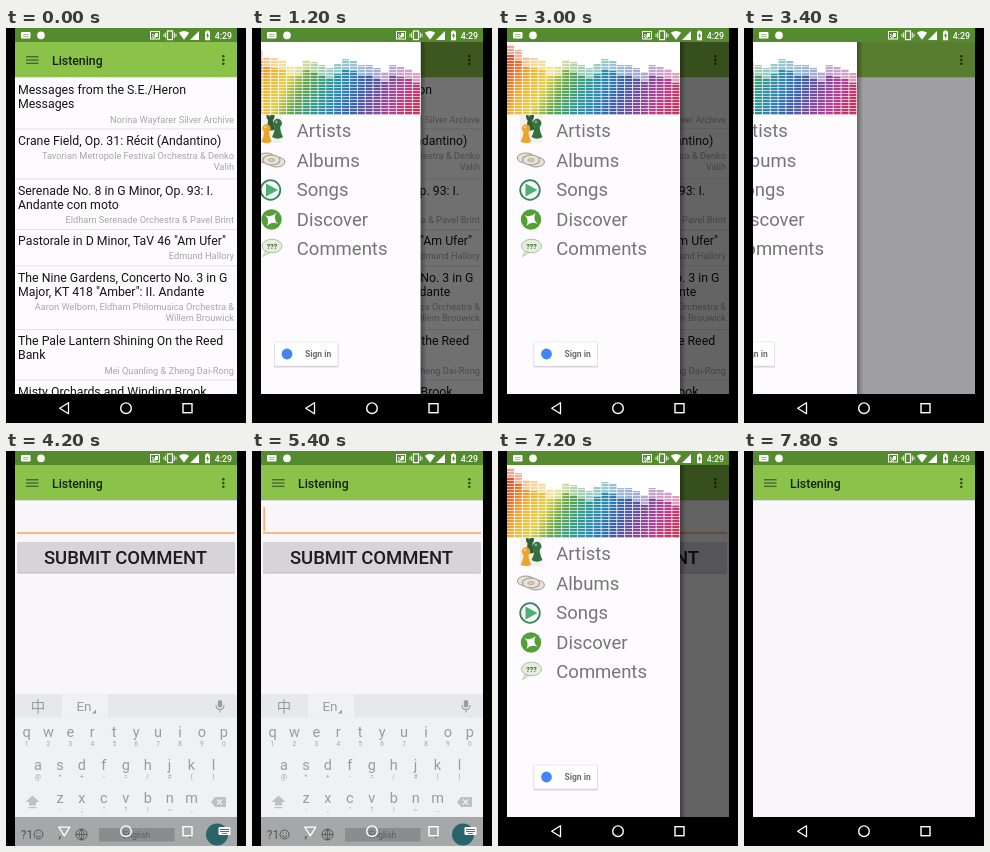
An HTML page for the animation above (8000 ms loop, 240 px wide and 395 px high).

```html
<!DOCTYPE html>
<html lang="en">
<head>
<meta charset="utf-8">
<title>Listening</title>
<style>
  html, body { margin: 0; width: 100%; height: 100%; overflow: hidden; background: #000; }
  svg { display: block; width: 240px; height: 395px; font-family: Roboto, "Noto Sans", sans-serif; }
  .title { font-size: 12.3px; fill: #141414; }
  .artist { font-size: 9.25px; fill: #a6a5a7; text-anchor: end; }
  .menu { font-size: 18.5px; fill: #757575; }
  .key { font-size: 14.5px; text-anchor: middle; fill: #70787d; }
  .hint { font-size: 6.5px; text-anchor: middle; fill: #7d868b; }
</style>
</head>
<body>
<svg id="stage" viewBox="0 0 240 395" xmlns="http://www.w3.org/2000/svg"></svg>
<script>
const rect = (x, y, w, h, fill, more = '') =>
  `<rect x="${x}" y="${y}" width="${w}" height="${h}" fill="${fill}" ${more}/>`;
const circle = (x, y, r, fill, more = '') =>
  `<circle cx="${x}" cy="${y}" r="${r}" fill="${fill}" ${more}/>`;
const path = (d, fill, more = '') => `<path d="${d}" fill="${fill}" ${more}/>`;
const line = (d, color, width = 1) =>
  path(d, 'none', `stroke="${color}" stroke-width="${width}"`);
const text = (x, y, s, cls, more = '') =>
  `<text x="${x}" y="${y}" class="${cls}" ${more}>${s.replace(/&/g, '&amp;')}</text>`;

// Song list: y of the first baseline, title lines, artist lines
const songs = [
  [66, ['Messages from the S.E./Heron', 'Messages'], ['Norina Wayfarer Silver Archive']],
  [116.5, ['Crane Field, Op. 31: Récit (Andantino)'], ['Tavorian Metropole Festival Orchestra & Denko', 'Valih']],
  [166.5, ['Serenade No. 8 in G Minor, Op. 93: I.', 'Andante con moto'], ['Eldham Serenade Orchestra & Pavel Brint']],
  [217, ['Pastorale in D Minor, TaV 46 "Am Ufer"'], ['Edmund Hallory']],
  [253.5, ['The Nine Gardens, Concerto No. 3 in G', 'Major, KT 418 "Amber": II. Andante'],
    ['Aaron Welborn, Eldham Philomusica Orchestra &', 'Willem Brouwick']],
  [317, ['The Pale Lantern Shining On the Reed', 'Bank'], ['Mei Quanling & Zheng Dai-Rong']],
  [367.5, ['Misty Orchards and Winding Brook'], []]
];

function listPage() {
  return rect(9, 49, 222, 317, '#fdfbfe') + songs.map(([y, titles, artists], i) => {
    const sub = y + (titles.length - 1) * 14.4 + 14.2;
    return (i ? rect(9, y - 16, 222, .8, '#dddbde') : '') +
      titles.map((s, n) => text(12, y + n * 14.4, s, 'title')).join('') +
      artists.map((s, n) => text(228, sub + n * 11.2, s, 'artist')).join('');
  }).join('');
}

const commentPage =
  rect(11, 81.3, 218, 1.4, '#f2a05a', 'id="underline"') +
  rect(11.5, 56, 1.2, 24, '#ff8a3c', 'id="cursor"') +
  rect(11, 92, 218, 30.5, '#bdbbbe', 'rx="1.5"') +
  rect(11, 91, 218, 30.5, '#d6d4d8', 'rx="1.5"') +
  text(119.5, 113, 'SUBMIT COMMENT', '', 'font-size="18.5" font-weight="500" text-anchor="middle" fill="#1c1c1c"');

const appBar =
  rect(9, 49, 222, 1, '#000', 'opacity=".1"') +
  rect(9, 14, 222, 35, '#8bc34a') +
  [28.7, 32, 35.3].map(y => rect(20, y - .6, 12.5, 1.3, '#46622a')).join('') +
  text(46, 37, 'Listening', '', 'font-size="12.3" font-weight="500" fill="#16200c"') +
  [28.2, 32, 35.8].map(y => circle(217.3, y, 1.3, '#33491d')).join('');

const statusBar =
  rect(9, 0, 222, 14, '#558b2f') +
  rect(15, 4, 9.5, 6.5, '#fff', 'rx="1"') + line('M17 6.5h5.5M17 8.4h5.5', '#7ca45e', .7) +
  circle(35, 7.4, 3.8, '#fff') +
  rect(144.5, 3.5, 9, 7.5, 'none', 'stroke="#fff"') +
  line('M146 6.3q3 .4 3.4 4M146 8.3q1.5 .3 1.7 2.5', '#fff') + rect(149, 5, 3, 4, '#fff') +
  rect(161.5, 3, 5, 8.6, 'none', 'stroke="#fff" stroke-width="1.2"') +
  line('M159.7 4.5v5.5M168.3 4.5v5.5M158 5.8v3M170 5.8v3', '#fff', .9) +
  path('M172.8 4.8q5.2-3.6 10.4 0L178 11.8Z', '#fff') +
  path('M193 3v9h-9Z', '#fff') +
  path('M199 3.5h1.3v-1h2.4v1h1.3v8.7h-5Z', '#fff') + path('M202 4.5l-2 3.5h1.2v3l2-3.7h-1.2Z', '#558b2f') +
  text(208.7, 10.8, '4:29', '', 'font-size="8.8" font-weight="500" fill="#fff"');

// Equalizer banner: bars share one slanted rainbow
const rainbow = ['#d2362e', '#e8692c', '#f2b32f', '#e3cf45', '#5fa648', '#2f9a8c', '#2d86b8', '#3c5ea8', '#7a4a9c', '#b53f94', '#c9335c'];
const tops = [17, 22, 29, 30, 32, 38, 38, 32, 34, 37, 40, 36, 31, 33, 37, 37, 40, 44, 37, 39, 41, 45];
const banner = rect(9, 14, 173, 73, '#fff') +
  tops.map((y, i) => {
    const x = 9 + i * 7.87;
    return rect(x, y, 7.1, 10, 'url(#rainbow)', 'opacity=".5"') + rect(x, y + 10, 7.1, 77 - y, 'url(#rainbow)');
  }).join('') +
  Array.from({ length: 24 }, (_, i) => rect(9, 17 + i * 3, 173, .9, '#fff', 'opacity=".75"')).join('');

const pawn = (x, y, s, color) =>
  `<g transform="translate(${x} ${y}) scale(${s})">` + path('M-5 10Q-2 4-2.5 0h5Q2 4 5 10Q0 13-5 10Z', color) +
  circle(0, -2.5, 4, color) + circle(-1, -3.7, 1.2, '#fff', 'opacity=".45"') + '</g>';
const disc = (x, y) =>
  `<ellipse cx="${x}" cy="${y}" rx="8.5" ry="5" fill="#e6e2d8" stroke="#85847a" stroke-width=".8"/>` +
  `<ellipse cx="${x}" cy="${y}" rx="3.6" ry="2.1" fill="#d9b894"/>` +
  `<ellipse cx="${x}" cy="${y}" rx="1.8" ry="1" fill="#fff" stroke="#85847a" stroke-width=".5"/>`;

const icons =
  rect(22, 87, 22, 28, '#f1f1ee') +
  pawn(32, 91, 1, '#2f5f35') + pawn(39, 98, 1.1, '#35703f') + pawn(28, 103, 1.05, '#eda42c') +
  disc(27.8, 130) + disc(38, 134) + disc(33, 132) +
  circle(32, 162, 9.8, '#f4faf6', 'stroke="#3f8063" stroke-width="1.8"') + path('M27.5 155.5v13l12-6.5Z', '#4fae72') +
  circle(33, 191.5, 10.2, '#54a036') +
  path('M0-8Q1-1 8 0Q1 1 0 8Q-1 1-8 0Q-1-1 0-8Z', '#fff', 'transform="translate(33 191.5) rotate(35)"') +
  `<ellipse cx="33.5" cy="218" rx="10" ry="6.8" fill="#e4eedd" stroke="#9db08f" stroke-width=".8"/>` +
  path('M27 223.5l-2.5 5 7-4Z', '#e4eedd', 'stroke="#9db08f" stroke-width=".6"') +
  text(33.5, 220.5, '???', '', 'font-size="7" font-weight="700" text-anchor="middle" fill="#3f6b36"');

const signIn =
  rect(35.5, 314.5, 64.5, 25, '#000', 'rx="1.5" opacity=".16"') +
  rect(36, 314, 63.5, 24, '#fff', 'rx="1" stroke="#dedede" stroke-width=".6"') +
  circle(48.5, 326, 5.4, '#4285f4') +
  text(66.5, 329.3, 'Sign in', '', 'font-size="8.5" font-weight="700" fill="#6d6d6d"');

const drawer =
  rect(182, 14, 6, 352, 'url(#edge)') + rect(9, 14, 173, 352, '#fdfbfe') + icons + banner +
  ['Artists', 'Albums', 'Songs', 'Discover', 'Comments']
    .map((s, i) => text(58.3, 109 + i * 29.6, s, 'menu')).join('') + signIn;

// Keyboard rows: first x, y, letters, hints
const rows = [
  [20.5, 286, 'qwertyuiop', '1234567890'],
  [32, 319, 'asdfghjkl', '@*+-=/#()'],
  [54, 352, 'zxcvbnm', ':;"?!~…']
];
const keyboard =
  rect(9, 243, 222, 156, '#eceff1') + rect(9, 243, 222, 23.5, '#dfe3e6') + rect(56, 243, 46, 23.5, '#eceff1') +
  text(32, 260.5, '中', 'key', 'style="font-family:\'Noto Sans CJK SC\',\'Noto Sans CJK\',sans-serif"') +
  text(78, 260, 'En', 'key', 'style="font-size:13.5px"') + path('M90 258.5v4h-4Z', '#70787d') +
  rect(211.8, 249, 4.4, 7.5, '#70787d', 'rx="2.2"') + line('M210 254q0 4.5 4 4.5t4-4.5M214 258.5v3', '#70787d', 1.1) +
  rows.map(([x, y, keys, hints]) => [...keys].map((k, i) =>
    text(x + i * 21.93, y, k, 'key') + text(x + i * 21.93, y + 9, hints[i], 'hint')).join('')).join('') +
  path('M26.5 344.5l7 6.5h-3.5v3.5h-7V351h-3.5ZM22.5 356h8v1.3h-8Z', '#a3abb0') +
  path('M205 351l4-5h11v10h-11Z', '#a3abb0') + line('M211 348.5l5 5M216 348.5l-5 5', '#eceff1', 1.2) +
  text(21, 388, '?1', 'key', 'style="font-size:12px"') +
  circle(32.5, 383.5, 4.5, 'none', 'stroke="#70787d"') + line('M30 384.5q2.5 3 5 0M31 381.5v1M34 381.5v1', '#70787d', .9) +
  text(54, 387, ',', 'key') +
  circle(75.5, 383.5, 5.5, 'none', 'stroke="#70787d"') +
  line('M70 383.5h11M75.5 378v11M75.5 378q-5 5.5 0 11q5-5.5 0-11', '#70787d', .8) +
  rect(93, 377, 75.5, 13.5, '#c3c9cd') + text(130.5, 387, 'English', 'hint', 'style="font-size:8.5px"') +
  text(184, 387, '.', 'key') + circle(211, 383.5, 11, '#3c8f98');

const nav =
  path('M62.5 374.8v11l-8.8-5.5Z', 'none', 'id="back" stroke="#fff" stroke-width="1.3" stroke-linejoin="round"') +
  circle(120, 380.2, 5.3, 'none', 'stroke="#fff" stroke-width="1.4"') +
  rect(177, 375.7, 9, 9, 'none', 'stroke="#fff" stroke-width="1.4"') +
  '<g id="switcher">' + rect(212.5, 376, 12, 8, '#fff', 'rx="1"') +
  line('M214 378.5h9M214 380.5h9', '#555', .9) + line('M216 382.5h5', '#555', .8) + '</g>';

const stops = rainbow.map((c, i) => `<stop offset="${i / (rainbow.length - 1)}" stop-color="${c}"/>`).join('');

document.getElementById('stage').innerHTML =
  `<defs><linearGradient id="edge"><stop stop-opacity=".35"/><stop offset="1" stop-opacity="0"/></linearGradient>
   <linearGradient id="rainbow" gradientUnits="userSpaceOnUse" x1="5" y1="20" x2="165" y2="100">${stops}</linearGradient>
   <clipPath id="body">${rect(9, 14, 222, 352, '#000')}</clipPath>
   <clipPath id="screen">${rect(9, 0, 222, 395, '#000')}</clipPath></defs>` +
  rect(0, 0, 240, 395, '#000') +
  '<g clip-path="url(#body)">' + rect(9, 14, 222, 352, '#f8f6f9') +
  `<g id="list">${listPage()}</g><g id="comment">${commentPage}</g>` + appBar +
  rect(9, 14, 222, 352, '#000', 'id="scrim"') + `<g id="drawer">${drawer}</g></g>` + statusBar +
  `<g clip-path="url(#screen)"><g id="ime">${keyboard}</g></g>` + nav;

const el = id => document.getElementById(id);
const WIDTH = 173, LOOP = 8000;

// time, page, visible drawer width, keyboard (0 hidden, 1 moving, 2 up), cursor, error line
const steps = [
  [0, 'list', 0, 0, 0],
  [1200, 'list', 159.5, 0, 0],
  [1400, 'list', WIDTH, 0, 0],
  [3400, 'blank', 104, 0, 0],
  [3600, 'blank', 20, 0, 0],
  [3800, 'blank', 0, 0, 0],
  [4000, 'comment', 0, 0, 1],
  [4200, 'comment', 0, 1, 0],
  [4400, 'comment', 0, 2, 1],
  [4600, 'comment', 0, 2, 0],
  [5200, 'comment', 0, 2, 1],
  [5400, 'comment', 0, 1, 1],
  [5600, 'comment', 0, 0, 0],
  [6200, 'comment', 0, 0, 1],
  [6400, 'comment', 135.5, 0, 1, 1],
  [6600, 'comment', 165, 0, 1, 1],
  [6800, 'comment', WIDTH, 0, 1],
  [7400, 'blank', 104, 0, 0],
  [7600, 'blank', 20, 0, 0],
  [7800, 'blank', 0, 0, 0]
];

const show = (id, on) => el(id).setAttribute('visibility', on ? 'inherit' : 'hidden');
let current;

function draw(t) {
  const step = steps.findLast(s => s[0] <= t);
  if (step === current) return;
  current = step;
  const [, page, open, ime, cursor, error] = step;
  el('list').style.display = page === 'list' ? '' : 'none';
  el('comment').style.display = page === 'comment' ? '' : 'none';
  show('cursor', cursor);
  el('underline').setAttribute('fill', error ? '#f02a1c' : '#f2a05a');
  show('drawer', open);
  el('drawer').setAttribute('transform', `translate(${open - WIDTH} 0)`);
  el('scrim').setAttribute('opacity', .6 * open / WIDTH);
  show('ime', ime);
  el('ime').setAttribute('transform', `translate(0 ${ime === 2 ? -33 : 0})`);
  el('ime').setAttribute('opacity', ime === 2 ? 1 : .7);
  el('back').setAttribute('transform', ime ? 'rotate(-90 58.3 380.3)' : '');
  show('switcher', ime);
}

const start = performance.now();
function tick() {
  draw((performance.now() - start) % LOOP);
  requestAnimationFrame(tick);
}
draw(0);
tick();
</script>
</body>
</html>
```
